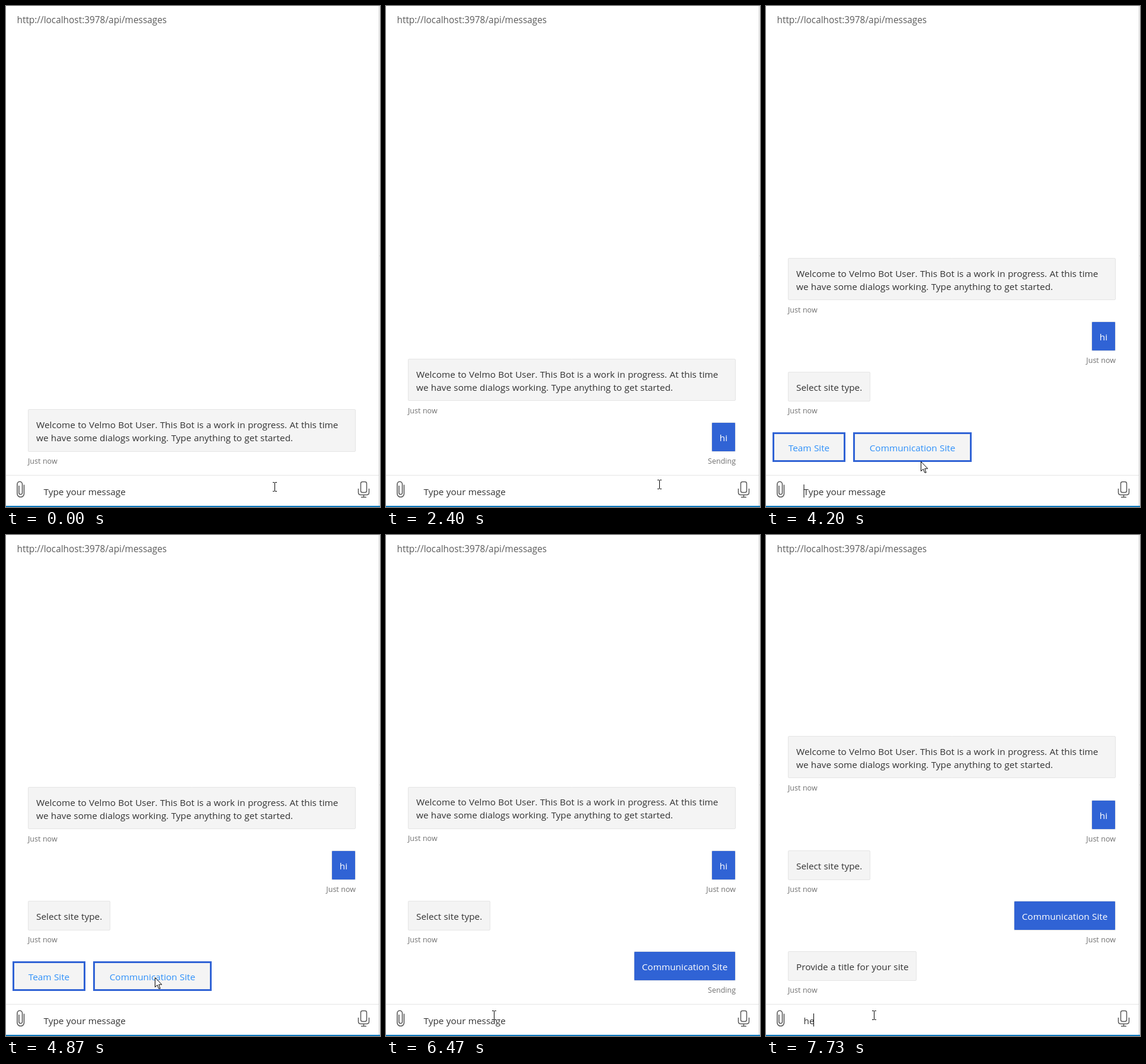
An HTML page with a canvas for the animation above (8 s loop, 631 by 845 pixels).

```html
<!DOCTYPE html>
<html lang="en">
<head>
<meta charset="utf-8">
<title>Chat with a bot</title>
<style>
html, body { margin: 0; width: 631px; height: 845px; overflow: hidden; background: #fff; }
canvas { display: block; }
</style>
</head>
<body>
<canvas id="stage" width="631" height="845"></canvas>
<script>
const ctx = document.getElementById('stage').getContext('2d');
const LOOP = 8000;
const BLUE = '#3063d5', PALE = '#f4f4f4', EDGE = '#e5e5e5', ICON = '#5a5a5a';

// [from ms, to ms] during which the text caret is lit
const caretOn = [[530, 1000], [1470, 2400], [2870, 3400], [3930, 4470],
  [5000, 5530], [5800, 6330], [6800, LOOP]];

// [ms, x, y] of the mouse pointer, linear in between
const pointerPath = [[0, 453, 811], [860, 453, 811], [1000, 461, 807], [3730, 461, 807],
  [3930, 258, 766], [4130, 258, 766], [4200, 261, 768], [4530, 294, 752], [4800, 262, 744],
  [5000, 228, 750], [5330, 199, 756], [6070, 199, 756], [6470, 182, 810], [LOOP, 182, 810]];

const typed = t =>
  t >= 1470 && t < 1670 ? 'h' : t >= 1670 && t < 1870 ? 'hi' :
  t >= 7600 && t < 7730 ? 'h' : t >= 7730 ? 'he' : '';

function text(str, x, y, color = '#333', size = 15.35, align = 'left') {
  ctx.font = `${size}px "Open Sans", "Noto Sans", sans-serif`;
  ctx.wordSpacing = '0.3px';
  ctx.textAlign = align;
  ctx.fillStyle = color;
  ctx.fillText(str, x, y);
}

function rect(x, y, w, h, color) {
  ctx.fillStyle = color;
  ctx.fillRect(x, y, w, h);
}

function stroke(d, color, width) {
  ctx.strokeStyle = color;
  ctx.lineWidth = width;
  ctx.stroke(new Path2D(d));
}

function bubble(x, y, w, h, fill) {
  ctx.beginPath();
  ctx.roundRect(x + .5, y + .5, w - 1, h - 1, 1.5);
  ctx.fillStyle = fill;
  ctx.fill();
  ctx.strokeStyle = EDGE;
  ctx.lineWidth = 1;
  ctx.stroke();
}

const label = (str, right, y) =>
  text(str, right ? 590 : 37, y, '#707070', 12.5, right ? 'right' : 'left');

function botMessage(str, y, w) {
  bubble(37, y, w, 50, PALE);
  text(str, 51, y + 32);
  label('Just now', false, y + 70);
}

function userMessage(str, y, w, status = 'Just now') {
  bubble(590 - w, y, w, 50, BLUE);
  text(str, 590 - w / 2, y + 32, '#fff', 15.35, 'center');
  label(status, true, y + 70);
}

function welcome(slots, lift) {
  const y = Math.round(680.3 - 85.23 * slots), base = y + 32 - lift;
  bubble(37, y, 553, slots ? 71 : 72, PALE);
  text('Welcome to Velmo Bot User. This Bot is a work in progress. At this time', 51, base);
  text('we have some dialogs working. Type anything to get started.', 51, base + 22);
  label('Just now', false, base + 60);
}

function button(str, x, w, focused) {
  if (focused) rect(x - 1, 718, w + 2, 52, '#0f71cf');
  rect(x, 719, w, 50, BLUE);
  rect(x + 3, 722, w - 6, 44, PALE);
  text(str, x + w / 2, 751, '#2f90fa', 15.35, 'center');
}

function conversation(t) {
  const slots = t < 1870 ? 0 : t < 2800 ? 1 : t < 6730 ? 3 : 4;
  const answered = t >= 5730;
  welcome(slots, answered && slots === 3 ? 1 : 0);
  if (slots >= 1) userMessage('hi', 702 - 85 * (slots - 1), 41, slots > 1 ? 'Just now' : 'Sending');
  if (slots >= 3) botMessage('Select site type.', 702 - 85 * (slots - 2), 139);
  if (answered) {
    userMessage('Communication Site', 702 - 85 * (slots - 3), 172, slots > 3 ? 'Just now' : 'Sending');
  } else if (slots === 3) {
    button('Team Site', 11, 123);
    button('Communication Site', 147, 200, t >= 5530);
  }
  if (slots === 4) botMessage('Provide a title for your site', 702, 217);
}

function inputBar(t) {
  rect(0, 791, 629, 1, EDGE);
  stroke('M30.5 807.5V822.5a5.8 5.8 0 0 1-11.6 0V806.5a4.3 4.3 0 0 1 8.6 0V821a2.8 2.8 0 0 1-5.6 0V809',
    ICON, 1.6);
  stroke('M601.5 802.5h4q3 0 3 3v12q0 3-3 3h-4q-3 0-3-3v-12q0-3 3-3z' +
    'M594.5 814v6.5q0 4 4 4h10q4 0 4-4v-6.5M603.5 824.5v4M599 828.5h9', ICON, 1.5);
  const str = typed(t);
  text(str || 'Type your message', 63.5, 825);
  if (caretOn.some(([from, to]) => t >= from && t < to)) {
    const x = str ? 62 + Math.round(ctx.measureText(str).width) : 63.5;
    rect(x, 807, 1, 22, '#000');
  }
}

function pointer(t) {
  const time = Math.floor((t + 4) * .015) / .015;
  const i = Math.max(1, pointerPath.findIndex(p => p[0] > time));
  const [t0, x0, y0] = pointerPath[i - 1], [t1, x1, y1] = pointerPath[i];
  const k = (time - t0) / (t1 - t0);
  ctx.save();
  ctx.translate(Math.round(x0 + (x1 - x0) * k), Math.round(y0 + (y1 - y0) * k));
  if (ctx.getTransform().f > 791) {
    stroke('M-3-7.5H0M1-7.5H4M-3 7.5H0M1 7.5H4M.5-7V7', '#000', 1);
  } else {
    const arrow = 'M.5.5V16.5L4.2 13L6.8 19H9.2L6.8 12.2H11.8Z';
    ctx.fillStyle = '#fff';
    ctx.fill(new Path2D(arrow));
    stroke(arrow, '#000', 1);
  }
  ctx.restore();
}

function draw(now) {
  const t = now % LOOP;
  rect(0, 0, 631, 845, '#fff');
  text('http://localhost:3978/api/messages', 18.5, 29, '#5c5c5c', 15.4);
  conversation(t);
  inputBar(t);
  rect(629, 0, 1, 843, '#c8c8c8');
  rect(630, 421, 1, 1, '#ddd');
  rect(0, 843, 631, 2, '#0a78be');
  pointer(t);
}

let start;
function frame(now) {
  start ??= now;
  draw(now - start);
  requestAnimationFrame(frame);
}
draw(0);
requestAnimationFrame(frame);
</script>
</body>
</html>
```
